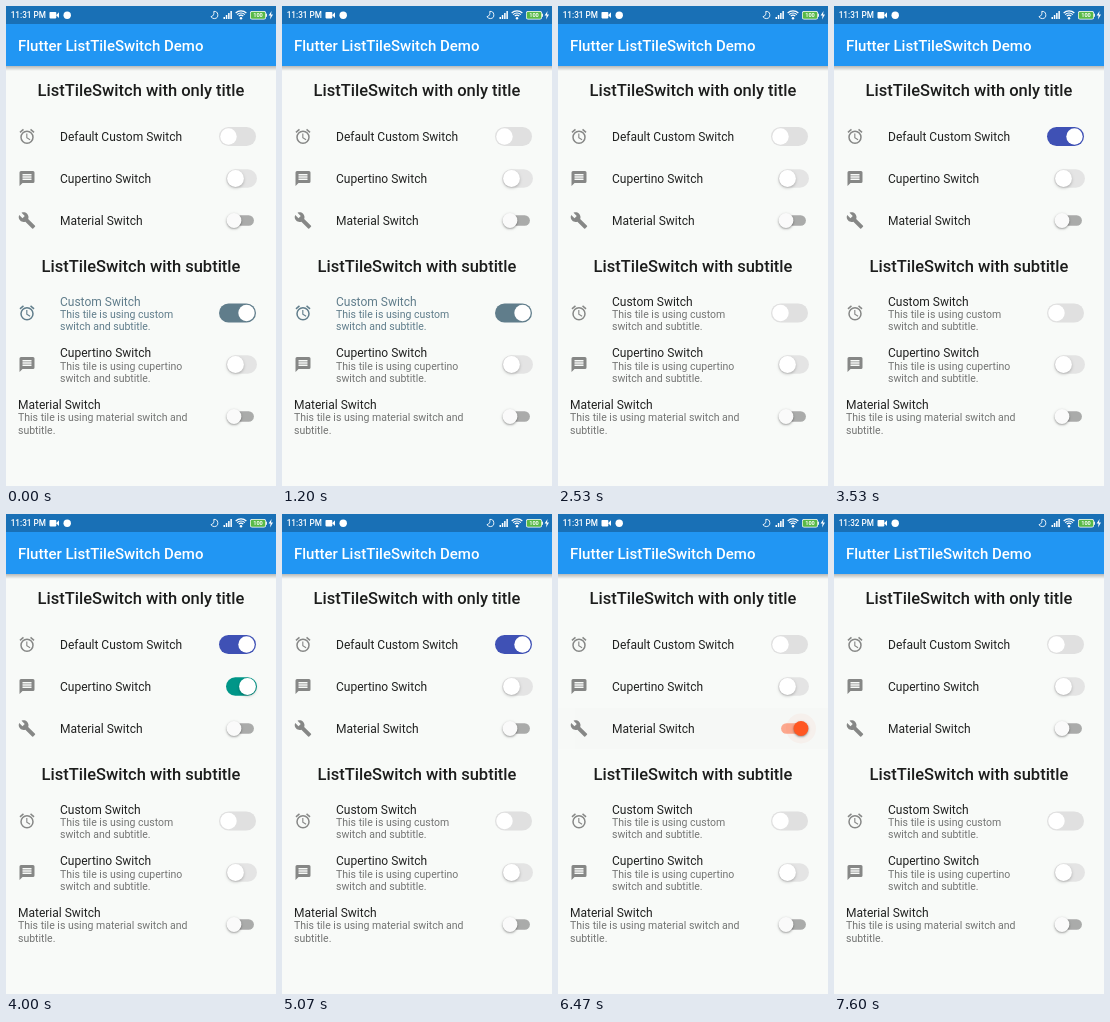
Recreate the animation shown at these times as an HTML page with a canvas. Size 270 by 480 pixels, loop 8000 ms.

```html
<!DOCTYPE html>
<html lang="en">
<head>
<meta charset="utf-8">
<title>Switch tiles</title>
<style>
html, body { margin: 0; width: 100%; height: 100%; overflow: hidden; background: #f8faf8; }
canvas, svg { position: absolute; left: 0; top: 0; width: 270px; height: 480px; }
text { font-family: Roboto, "Noto Sans", sans-serif; }
.bar { font-size: 15px; font-weight: 500; fill: #fff; }
.head { font-size: 16.5px; font-weight: 500; fill: #1c1d1c; text-anchor: middle; }
.title { font-size: 12px; fill: #202120; }
.sub { font-size: 10.5px; fill: #747574; }
.status { font-size: 8.2px; font-weight: 500; fill: #fff; }
.charge { font-size: 5.6px; font-weight: 700; fill: #fff; text-anchor: middle; }
.on .title, .on .sub { fill: #607d8b; }
</style>
</head>
<body>
<canvas id="stage"></canvas>
<svg viewBox="0 0 270 480">
  <text class="status" id="clock" x="4.7" y="12">11:31 PM</text>
  <text class="charge" x="252" y="11.1">100</text>
  <text class="bar" x="12" y="45">Flutter ListTileSwitch Demo</text>
  <text class="head" x="135" y="90.2">ListTileSwitch with only title</text>
  <text class="title" x="54" y="135">Default Custom Switch</text>
  <text class="title" x="54" y="177">Cupertino Switch</text>
  <text class="title" x="54" y="219">Material Switch</text>
  <text class="head" x="135" y="265.7">ListTileSwitch with subtitle</text>
  <g id="custom">
    <text class="title" x="54" y="299.5">Custom Switch</text>
    <text class="sub" x="54" y="312">This tile is using custom</text>
    <text class="sub" x="54" y="324.3">switch and subtitle.</text>
  </g>
  <text class="title" x="54" y="351.2">Cupertino Switch</text>
  <text class="sub" x="54" y="363.5">This tile is using cupertino</text>
  <text class="sub" x="54" y="375.8">switch and subtitle.</text>
  <text class="title" x="12" y="402.8">Material Switch</text>
  <text class="sub" x="12" y="415.2">This tile is using material switch and</text>
  <text class="sub" x="12" y="427.5">subtitle.</text>
</svg>
<script>
const LOOP = 8000, TOGGLE = 190, GREY = '#868786', SLATE = '#607d8b';
const canvas = document.getElementById('stage');
const c = canvas.getContext('2d');
const clock = document.getElementById('clock');
const customText = document.getElementById('custom');
const dpr = window.devicePixelRatio || 1;
canvas.width = 270 * dpr;
canvas.height = 480 * dpr;

const rows = [
  { kind: 'custom', y: 130.5, h: 42, icon: alarm, color: [63, 81, 181] },
  { kind: 'cupertino', y: 172.5, h: 42, icon: message, color: [0, 150, 136] },
  { kind: 'material', y: 214.5, h: 42, icon: wrench, color: [255, 87, 34] },
  { kind: 'custom', y: 307, h: 44, icon: alarm, color: [96, 125, 139], start: 1 },
  { kind: 'cupertino', y: 358.5, h: 44, icon: message, color: [0, 150, 136] },
  { kind: 'material', y: 410.5, h: 44, color: [255, 87, 34] }
];

// Row, time, new value, ripple length
const taps = [
  { row: 3, at: 1200, to: 0, len: 470 },
  { row: 0, at: 2530, to: 1, len: 470 },
  { row: 1, at: 3530, to: 1, len: 470 },
  { row: 1, at: 4800, to: 0, len: 270 },
  { row: 0, at: 5530, to: 0, len: 340 },
  { row: 2, at: 6200, to: 1, len: 440 },
  { row: 2, at: 6930, to: 0, len: 270 }
];

const clamp = v => Math.max(0, Math.min(1, v));
const ease = v => v * v * (3 - 2 * v);
const mix = (a, b, k) => a + (b - a) * k;
const rgb = (a, b, k) => `rgb(${a.map((v, i) => Math.round(mix(v, b[i], k)))})`;

function disc(x, y, r, fill) {
  c.fillStyle = fill;
  c.beginPath();
  c.arc(x, y, r, 0, 7);
  c.fill();
}

function pill(x, y, w, h, fill, r = h / 2) {
  c.fillStyle = fill;
  c.beginPath();
  c.roundRect(x, y, w, h, r);
  c.fill();
}

function line(points, width, color) {
  c.strokeStyle = color;
  c.lineWidth = width;
  c.beginPath();
  points.forEach(([x, y]) => c.lineTo(x, y));
  c.stroke();
}

function shadow(blur, dy, alpha) {
  c.shadowColor = `rgba(0,0,0,${alpha})`;
  c.shadowBlur = blur * dpr;
  c.shadowOffsetY = dy * dpr;
}

// Icons live on a 24-unit grid
function alarm(color) {
  c.strokeStyle = color;
  c.lineWidth = 2;
  c.beginPath();
  c.arc(12, 13, 8, 0, 7);
  c.stroke();
  line([[11.75, 8], [11.75, 13.6], [16.1, 16.2]], 1.5, color);
  line([[2.6, 6.5], [7.3, 2.6]], 2, color);
  line([[21.4, 6.5], [16.7, 2.6]], 2, color);
}

function message(color) {
  c.fillStyle = color;
  c.fill(new Path2D('M20 2H4a2 2 0 0 0-2 2V22l4-4h14a2 2 0 0 0 2-2V4a2 2 0 0 0-2-2z' +
    'M18 14H6v-2h12zM18 11H6V9h12zM18 8H6V6h12z'), 'evenodd');
}

function wrench(color) {
  c.fillStyle = color;
  c.fill(new Path2D('M22.7 19l-9.1-9.1c.9-2.3.4-5-1.5-6.9-2-2-5-2.4-7.4-1.3L9 6 6 9 1.6 4.7' +
    'C.4 7.1.9 10.1 2.9 12.1c1.9 1.9 4.6 2.4 6.9 1.5l9.1 9.1c.4.4 1 .4 1.4 0l2.3-2.3c.5-.4.5-1.1.1-1.4z'));
}

const switches = {
  custom(row, k, glow) {
    pill(213, row.y - 9.5, 37, 19, rgb([224, 224, 224], row.color, k));
    disc(mix(222.5, 240.5, k), row.y, 8.2, '#fff');
    if (glow) pill(213, row.y - 9.5, 37, 19, `rgba(0,0,0,${0.13 * glow})`);
  },
  cupertino(row, k) {
    pill(220, row.y - 9.3, 31, 18.6, rgb([228, 228, 228], row.color, k));
    shadow(3, 1.2, 0.25);
    disc(mix(229.5, 241.5, k), row.y, 8.4, '#fff');
    shadow(0, 0, 0);
  },
  material(row, k, glow) {
    const x = mix(228, 243, k);
    const light = row.color.map(v => mix(249, v, 0.5));
    pill(223.1, row.y - 5.25, 24.8, 10.5, rgb([170, 171, 170], light, k));
    if (glow) disc(x, row.y, 15, `rgba(${k > 0.5 ? row.color : [0, 0, 0]},${0.1 * glow})`);
    shadow(2.2, 0.9, 0.42);
    disc(x, row.y, 7.4, rgb([250, 250, 250], row.color, k));
    shadow(0, 0, 0);
  }
};

function drawBars() {
  const g = c.createLinearGradient(0, 60, 0, 65);
  g.addColorStop(0, 'rgba(0,0,0,.26)');
  g.addColorStop(1, 'rgba(0,0,0,0)');
  c.fillStyle = g;
  c.fillRect(0, 60, 270, 5);
  c.fillStyle = '#2196f3';
  c.fillRect(0, 18, 270, 42);
  c.fillStyle = '#1970b6';
  c.fillRect(0, 0, 270, 18);

  // Camera and app badge
  pill(43.5, 6, 6.8, 6.4, '#fff', 0.8);
  c.beginPath();
  c.moveTo(50, 9.2);
  c.lineTo(53, 6.3);
  c.lineTo(53, 12.1);
  c.fill();
  disc(61.2, 9.2, 3.7, '#fff');

  // Moon
  c.strokeStyle = '#fff';
  c.lineWidth = 0.9;
  c.beginPath();
  c.arc(208.2, 9, 3.6, -1.7, 2.9 - 6.283 + 6.283 - 0.25);
  c.quadraticCurveTo(208.6, 9.6, 207.8, 5.4);
  c.stroke();

  // Signal
  c.fillStyle = '#fff';
  for (let i = 0; i < 4; i++) c.fillRect(217.5 + i * 2.3, 11 - i * 2, 1.5, 2 + i * 2);

  // Wi-Fi
  c.lineWidth = 1.2;
  for (const r of [3.2, 5.4, 7.6]) {
    c.beginPath();
    c.arc(235, 12.4, r, -2.35, -0.79);
    c.stroke();
  }
  disc(235, 12.2, 1.2, '#fff');

  // Battery and bolt
  pill(244, 5, 16, 8.4, '#fff', 2);
  pill(244.7, 5.7, 14.6, 7, '#58b947', 1.5);
  c.fillStyle = '#fff';
  c.fillRect(260, 7.6, 0.9, 3.2);
  c.fill(new Path2D('M265.6 5l-3 4.6h2l-.6 3.8 3-5h-2z'));
}

function drawRow(row, i, t) {
  let k = row.start || 0, glow = 0, reach = 0;
  for (const tap of taps) {
    if (tap.row !== i || t < tap.at) continue;
    k = mix(k, tap.to, ease(clamp((t - tap.at) / TOGGLE)));
    const u = (t - tap.at) / tap.len;
    if (u < 1) {
      glow = u < 0.43 ? u / 0.43 : ((1 - u) / 0.57) ** 2;
      reach = mix(20, 240, clamp(u));
    }
  }
  if (glow) {
    c.save();
    c.beginPath();
    c.rect(0, row.y - row.h / 2, 270, row.h);
    c.clip();
    c.fillStyle = `rgba(0,0,0,${0.012 * glow})`;
    c.fillRect(0, row.y - row.h / 2, 270, row.h);
    disc(218, row.y, reach * 1.3, `rgba(0,0,0,${0.012 * glow})`);
    c.restore();
  }
  if (row.icon) {
    c.save();
    c.translate(12, row.y - 9);
    c.scale(0.75, 0.75);
    row.icon(i === 3 && t < 1220 ? SLATE : GREY);
    c.restore();
  }
  switches[row.kind](row, k, glow);
}

function draw(t) {
  c.setTransform(dpr, 0, 0, dpr, 0, 0);
  c.fillStyle = '#f8faf8';
  c.fillRect(0, 0, 270, 480);
  drawBars();
  rows.forEach((row, i) => drawRow(row, i, t));
  customText.setAttribute('class', t < 1220 ? 'on' : '');
  clock.textContent = t < 7000 ? '11:31 PM' : '11:32 PM';
}

const begin = performance.now();
function tick() {
  draw((performance.now() - begin) % LOOP);
  requestAnimationFrame(tick);
}
tick();
</script>
</body>
</html>
```
